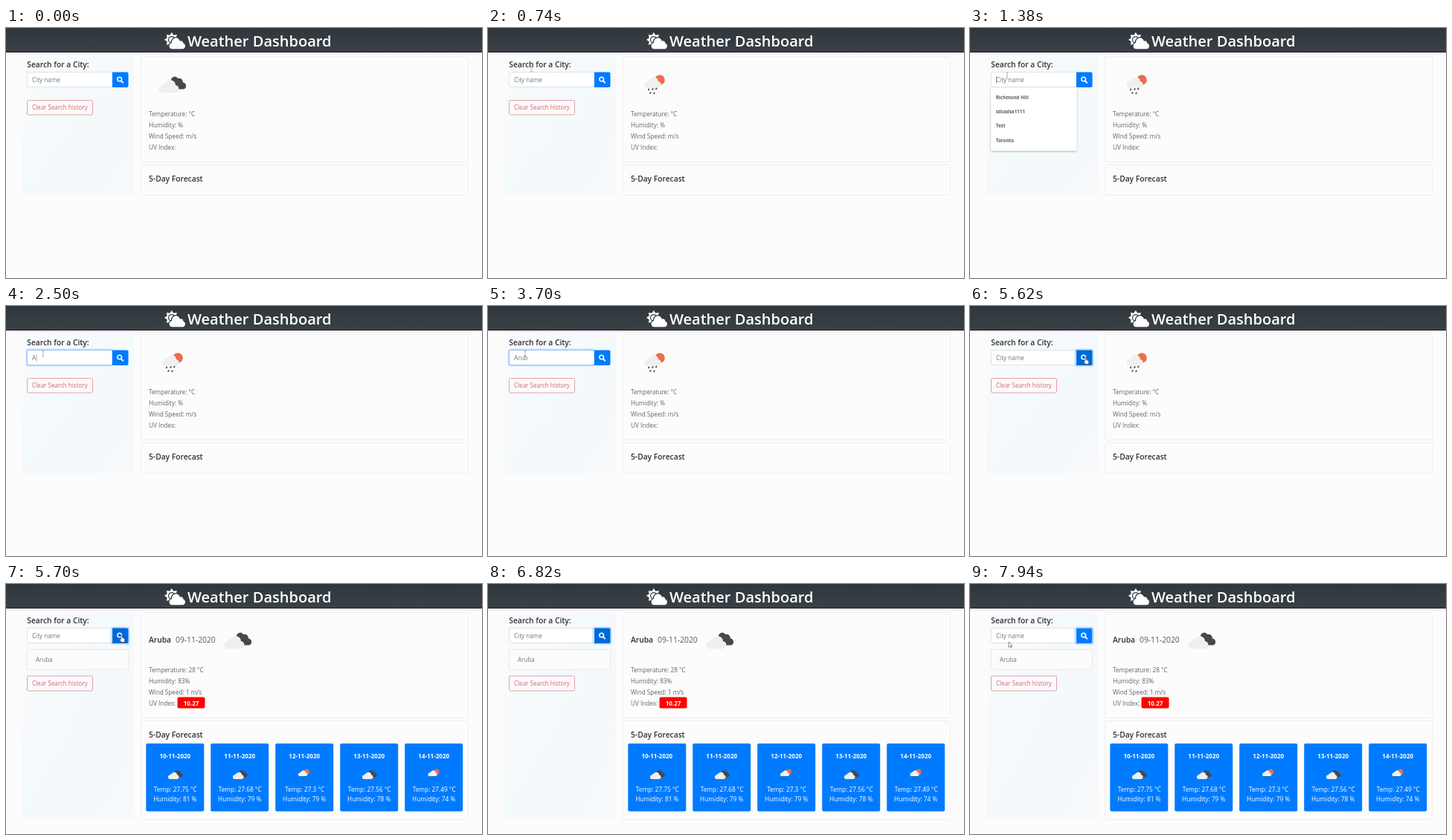
Write an HTML page that moves like this. It is 640 by 337 pixels and loops after 8 s.

```html
<!DOCTYPE html>
<html lang="en">
<head>
<meta charset="utf-8">
<title>Weather Dashboard</title>
<style>
html, body { margin: 0; width: 100%; height: 100%; overflow: hidden; background: #fcfcfc; }
svg { display: block; }
#stage { width: 100vw; height: 100vh; }
text { font: 8.2px "Open Sans", "Noto Sans", sans-serif; fill: #636567; }
.title { font-size: 20.05px; font-weight: 600; fill: #fff; }
.head { font-size: 10.25px; font-weight: 600; fill: #2c3034; }
.date { font-size: 10.3px; fill: #55585b; }
.field { font-size: 8.1px; fill: #70777d; }
.danger { font-size: 8.05px; fill: #d9626e; }
.hint { font-size: 6.3px; font-weight: 700; fill: #5f5f5f; }
.day text { font-size: 8.3px; font-weight: 500; fill: #fff; text-anchor: middle; }
.day .bold, .badge { font-size: 8px; font-weight: 700; fill: #fff; text-anchor: middle; }
.box { fill: none; stroke: #eeefef; }
.line { fill: #fff; stroke: #d8dce0; stroke-width: .8; }
.outline { fill: #fcfbfc; stroke: #e08a93; stroke-width: .8; }
.ring { fill: none; stroke: #b9daff; stroke-width: 1.7; }

/* 1% = 80 ms */
.a, .k { animation: 8s step-end infinite; }
.k { visibility: hidden; }
.first { animation-name: first; }
.before { animation-name: before; }
.rain { animation-name: rain; }
.after { animation-name: after; }
.list { animation-name: list; }
.caret1 { animation-name: caret1; }
.caret2 { animation-name: caret2; }
.empty { animation-name: empty; }
.l1 { animation-name: l1; }
.l2 { animation-name: l2; }
.l3 { animation-name: l3; }
.l4 { animation-name: l4; }
.l5 { animation-name: l5; }
.press { animation-name: press; }
.arrow { animation-name: arrow; }
.beam { animation-name: beam; }
.hand { animation-name: hand; }
.hover { opacity: 0; animation: hover 8s linear infinite; }
.focus { opacity: 0; animation: focus 8s linear infinite; }
.cursor { animation: move 8s step-end infinite; }

@keyframes first { 0% { visibility: visible } 6.25%, 100% { visibility: hidden } }
@keyframes before { 0% { visibility: visible } 71.25%, 100% { visibility: hidden } }
@keyframes rain { 6.25% { visibility: visible } 71.25%, 100% { visibility: hidden } }
@keyframes after { 0% { visibility: hidden } 71.25%, 100% { visibility: visible } }
@keyframes list { 17.25% { visibility: visible } 31.25%, 100% { visibility: hidden } }
@keyframes caret1 { 17.25% { visibility: visible } 24.25%, 100% { visibility: hidden } }
@keyframes caret2 { 31.25% { visibility: visible } 36.25%, 100% { visibility: hidden } }
@keyframes empty { 0% { visibility: visible } 31.25% { visibility: hidden } 68.25%, 100% { visibility: visible } }
@keyframes l1 { 31.25% { visibility: visible } 68.25%, 100% { visibility: hidden } }
@keyframes l2 { 36.25% { visibility: visible } 68.25%, 100% { visibility: hidden } }
@keyframes l3 { 39.25% { visibility: visible } 68.25%, 100% { visibility: hidden } }
@keyframes l4 { 46.25% { visibility: visible } 68.25%, 100% { visibility: hidden } }
@keyframes l5 { 47.25% { visibility: visible } 68.25%, 100% { visibility: hidden } }
@keyframes press { 0% { visibility: hidden } 68.25%, 100% { visibility: visible } }
@keyframes hover { 0%, 64.25% { opacity: 0 } 66.25%, 86% { opacity: 1 } 88%, 100% { opacity: 0 } }
@keyframes focus { 0%, 17.5% { opacity: 0 } 19.5%, 67.25% { opacity: 1 } 69.25%, 100% { opacity: 0 } }
@keyframes arrow {
  0% { visibility: hidden } 6.25% { visibility: visible } 8.25% { visibility: hidden }
  58.25% { visibility: visible } 64.25% { visibility: hidden }
  86.25%, 100% { visibility: visible }
}
@keyframes beam { 8.25% { visibility: visible } 57.25%, 100% { visibility: hidden } }
@keyframes hand {
  57.25% { visibility: visible } 58.25% { visibility: hidden }
  64.25% { visibility: visible } 76.25%, 100% { visibility: hidden }
}
@keyframes move {
  0% { transform: translate(2px, 66px) }
  6.25% { transform: translate(2px, 66px); animation-timing-function: steps(5) }
  11.25% { transform: translate(96px, 48px) }
  14.25% { transform: translate(50px, 64px) }
  54.25% { transform: translate(50px, 64px); animation-timing-function: steps(5, start) }
  59.25% { transform: translate(183px, 71px) }
  60.25% { transform: translate(179px, 71.5px); animation-timing-function: steps(8) }
  68.25% { transform: translate(155px, 69px) }
  86.25% { transform: translate(154px, 76px); animation-timing-function: ease-out }
  95.25% { transform: translate(136px, 297px) }
  96.25% { transform: translate(150px, 291px) }
  98.25% { transform: translate(98px, 180px) }
  99.25%, 100% { transform: translate(52px, 78px) }
}
</style>
</head>
<body>
<svg id="stage" viewBox="0 0 640 337" preserveAspectRatio="none">
  <defs>
    <linearGradient id="bar" x2="0" y2="1">
      <stop stop-color="#30373c"/><stop offset="1" stop-color="#394147"/>
    </linearGradient>
    <linearGradient id="fade" x2="0" y2="1">
      <stop stop-color="#ebe7ea"/><stop offset="1" stop-color="#fcfcfc"/>
    </linearGradient>
    <linearGradient id="side" x2="1" y2="1">
      <stop stop-color="#fafbfc"/><stop offset=".5" stop-color="#f4f9fc"/><stop offset="1" stop-color="#f7f9fb"/>
    </linearGradient>
    <filter id="soft" x="-10%" y="-10%" width="120%" height="125%">
      <feDropShadow dx="0" dy="1" stdDeviation=".8" flood-opacity=".35"/>
    </filter>
    <path id="puff" d="M5 23a5 5 0 0 1-.4-10A4.5 4.5 0 0 1 9 9.6A7.2 7.2 0 0 1 22.5 12.5A5.3 5.3 0 0 1 22 23z"/>
    <g id="cloudy">
      <path d="M16.5 6a5 5 0 0 1 9.3-2.500a5 5 0 0 1 6.5 5.5a4.6 4.6 0 0 1 1 9H26L19 9z" fill="#48484a"/>
      <use href="#puff" fill="#efefef"/>
    </g>
    <g id="rainy">
      <circle cx="21" cy="7" r="6.8" fill="#ec6e4c"/>
      <use href="#puff" transform="translate(0 -1.5) scale(.84)" fill="#f0f0f0"/>
      <path d="M6.3 19.5l-.5.9M11.700 19l-.5.900M16.500 18.500l-.5.900M8.700 24l-.5.900M13.700 24.500l-.5.900" stroke="#48484a" stroke-width="1.800" stroke-linecap="round"/>
    </g>
    <rect id="card" y="215" width="78" height="91.5" rx="2" fill="#007bff"/>
    <path id="button" d="M143 59.500h19.500a2 2 0 0 1 2 2v16.500a2 2 0 0 1-2 2H143z"/>
  </defs>

  <rect width="640" height="337" fill="#fcfcfc"/>
  <rect y="33" width="640" height="4" fill="url(#fade)"/>
  <rect width="640" height="33" fill="url(#bar)"/>
  <rect y="32" width="640" height="1" fill="#241c30"/>
  <svg x="213" y="6" width="28" height="22.4" viewBox="0 0 640 512" fill="#fff">
    <path d="M224 8L279 92 374 74 356 169 440 224 356 279 374 374 279 356 224 440 169 356 74 374 92 279 8 224 92 169 74 74 169 92z" stroke="#fff" stroke-width="14" stroke-linejoin="round"/>
    <circle cx="224" cy="224" r="98" stroke="#343c41" stroke-width="28"/>
    <path d="M240 512a96 96 0 0 1-7-191a112 112 0 0 1 245-55a64 64 0 0 1 97 60a96 96 0 0 1-31 186z" stroke="#343c41" stroke-width="60" paint-order="stroke"/>
  </svg>
  <text class="title" x="244" y="25">Weather Dashboard</text>

  <rect class="a before" x="22" y="38" width="150" height="187.5" fill="url(#side)"/>
  <rect class="k after" x="22" y="38" width="150" height="279" fill="url(#side)"/>
  <rect class="box" x="181.5" y="38.5" width="440" height="142" rx="2"/>
  <text class="head" x="28.3" y="53">Search for a City:</text>

  <g class="a before">
    <rect class="outline" x="28.5" y="97.5" width="88" height="19.5" rx="2"/>
    <text class="danger" x="35" y="110">Clear Search history</text>
    <text x="192" y="119">Temperature: °C</text>
    <text x="192" y="134">Humidity: %</text>
    <text x="192" y="149">Wind Speed: m/s</text>
    <text x="192" y="164">UV Index:</text>
    <rect class="box" x="181.5" y="184.5" width="440" height="41" rx="2"/>
  </g>
  <use class="a first" href="#cloudy" x="205.5" y="64.5"/>
  <use class="k rain" href="#rainy" x="210" y="63"/>
  <text class="head" x="192" y="206.5">5-Day Forecast</text>

  <g class="k after">
    <rect class="line" x="28.5" y="88.5" width="136" height="26.5" rx="2" style="fill:#fcfcfd;stroke:#e3e6e8"/>
    <text class="field" x="40" y="105">Aruba</text>
    <rect class="outline" x="28.5" y="124" width="88" height="20" rx="2"/>
    <text class="danger" x="35" y="137">Clear Search history</text>
    <text class="head" x="192" y="78.5">Aruba</text>
    <text class="date" x="228" y="78.5">09-11-2020</text>
    <use href="#cloudy" x="293.5" y="64.5"/>
    <text x="192" y="119">Temperature: 28 °C</text>
    <text x="192" y="134">Humidity: 83%</text>
    <text x="192" y="149">Wind Speed: 1 m/s</text>
    <text x="192" y="164">UV Index:</text>
    <rect x="230.5" y="152.5" width="37" height="15" rx="2" fill="#f00"/>
    <text class="badge" x="249" y="163.5">10.27</text>
    <rect class="box" x="181.5" y="184.5" width="440" height="133" rx="2"/>
    <g class="day">
      <use href="#card" x="188.3"/><use href="#card" x="275.2"/><use href="#card" x="362.2"/><use href="#card" x="449.2"/><use href="#card" x="536.2"/>
      <use href="#cloudy" transform="translate(218 250.5) scale(.54)"/>
      <use href="#cloudy" transform="translate(305 250.5) scale(.54)"/>
      <use href="#rainy" transform="translate(393 249.5) scale(.54)"/>
      <use href="#cloudy" transform="translate(479 250.5) scale(.54)"/>
      <use href="#rainy" transform="translate(567.5 249.5) scale(.54)"/>
      <text class="bold" x="227.3" y="235">10-11-2020</text>
      <text class="bold" x="314.2" y="235">11-11-2020</text>
      <text class="bold" x="401.2" y="235">12-11-2020</text>
      <text class="bold" x="488.2" y="235">13-11-2020</text>
      <text class="bold" x="575.2" y="235">14-11-2020</text>
      <text x="227.8" y="279.5">Temp: 27.75 °C</text>
      <text x="314.7" y="279.5">Temp: 27.68 °C</text>
      <text x="401.7" y="279.5">Temp: 27.3 °C</text>
      <text x="488.7" y="279.5">Temp: 27.56 °C</text>
      <text x="575.7" y="279.5">Temp: 27.49 °C</text>
      <text x="227.3" y="292.5">Humidity: 81 %</text>
      <text x="314.2" y="292.5">Humidity: 79 %</text>
      <text x="401.2" y="292.5">Humidity: 79 %</text>
      <text x="488.2" y="292.5">Humidity: 78 %</text>
      <text x="575.2" y="292.5">Humidity: 74 %</text>
    </g>
  </g>

  <rect class="line" x="28.5" y="59.5" width="114.5" height="20" rx="2"/>
  <g class="focus">
    <rect class="ring" x="27.7" y="58.7" width="116" height="21.6" rx="2.5"/>
    <rect x="28.5" y="59.5" width="114.5" height="20" rx="2" fill="none" stroke="#8cc3ff" stroke-width=".8"/>
  </g>
  <use href="#button" fill="#007bff"/>
  <use class="hover" href="#button" fill="#0069d9"/>
  <rect class="k press ring" x="141.5" y="58.5" width="24" height="22.5" rx="2"/>
  <g fill="none" stroke="#fff" stroke-linecap="round">
    <circle cx="152.7" cy="69" r="2.8" stroke-width="1.5"/>
    <path d="M155 71.5l2.2 2.2" stroke-width="1.9"/>
  </g>

  <text class="a empty field" x="35" y="73">City name</text>
  <text class="field" x="35" y="73"><tspan class="k l1">A</tspan><tspan class="k l2">r</tspan><tspan class="k l3">u</tspan><tspan class="k l4">b</tspan><tspan class="k l5">a</tspan></text>
  <path class="k caret1" d="M35.5 65v10" stroke="#888" stroke-width=".7"/>
  <path class="k caret2" d="M41 65v10" stroke="#888" stroke-width=".7"/>

  <g class="k list">
    <rect x="28" y="80.5" width="115.500" height="85" rx="1.5" fill="#fff" filter="url(#soft)"/>
    <text class="hint" x="34.7" y="95.5">Richmond Hill</text>
    <text class="hint" x="34.7" y="115">sdsadsa1111</text>
    <text class="hint" x="34.7" y="134.3">Test</text>
    <text class="hint" x="34.7" y="153.5">Toronto</text>
  </g>

  <g class="cursor">
    <path class="k arrow" d="M0 0v7.200l1.700-1.500 1.200 2.500 1.100-.5-1.100-2.500h2.200z" fill="#fff" stroke="#444" stroke-width=".6"/>
    <path class="k beam" d="M-1.500-4h1l.5.500.5-.500h1M0-3.500v7M-1.500 4h1l.5-.500.500.500h1" fill="none" stroke="#777" stroke-width=".6"/>
    <path class="k hand" d="M-.7.600a.8.800 0 0 1 1.600 0v3l3.200.900q.9.300.7 1.400L4.200 9.500H.3L-2.300 6q-.3-1 .7-.800l.9.800z" fill="#fff" stroke="#333" stroke-width=".6"/>
  </g>
</svg>
</body>
</html>
```
